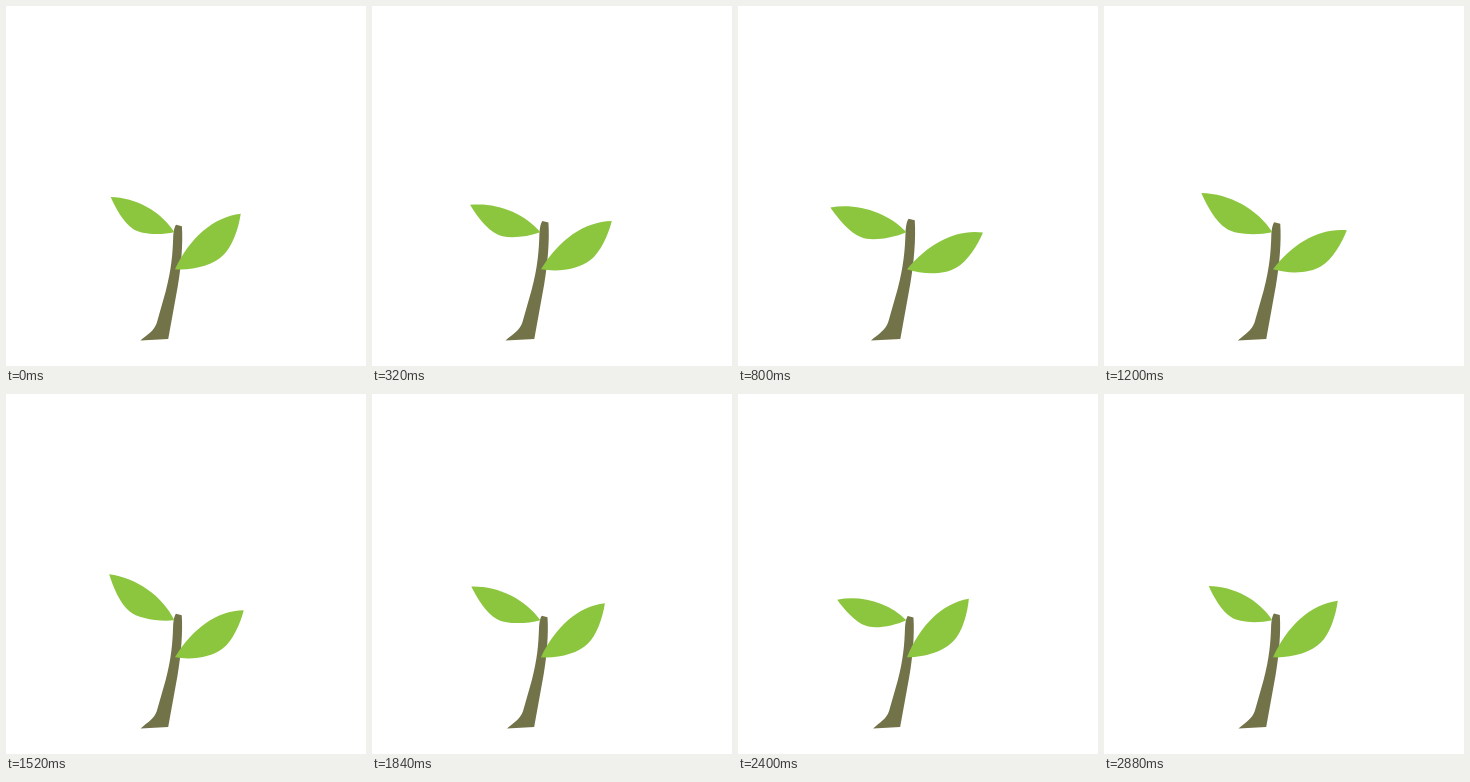
An HTML page with a canvas that plays this animation: 360 by 360 pixels, repeating every 2.96 s.

```html
<!DOCTYPE html>
<html lang="en">
<head>
<meta charset="utf-8">
<title>Seedling</title>
<style>
html, body { margin: 0; width: 100%; height: 100%; overflow: hidden; background: #fff; }
canvas { display: block; width: 100vmin; height: 100vmin; }
</style>
</head>
<body>
<canvas id="stage" width="360" height="360"></canvas>
<script>
const ctx = document.getElementById('stage').getContext('2d');
const LOOP = 2960, STEP = 80;
const GREEN = '#8cc63f', BROWN = '#73734a';
const { cos, PI } = Math;

// Angles in degrees above the horizon, lengths in pixels; p is the loop phase
const leftLeaf = {
  base: [168.4, 226.2], tip: [105, 191.5], side: 1,
  angle: p => 23.7 - 3.7 * cos(p) + 7.4 * cos(2 * p) + 0.5 * cos(3 * p) + cos(4 * p),
  length: p => 76.4 + 4.8 * cos(p - 2.44),
  path: new Path2D('M168.4 226.2C155 205.4 130 192 105 191.5C110 203 118 217 127 222.8C134.5 228.4 154 229.4 168.4 226.2Z')
};
const rightLeaf = {
  base: [169, 263.3], tip: [235, 207.6], side: -1,
  angle: p => 35.8 + 9 * cos(p + 1.19) - 1.4 * cos(2 * p + 2.38),
  length: p => 84.6 + 1.4 * cos(p),
  path: new Path2D('M169 263.3C184 232 207 211 235 207.6C233 222 226.5 241 217.3 249.3C207.5 259.2 187 264.6 169 263.3Z')
};
const stem = {
  foot: [160, 333.5], rest: 114,
  height: p => 115.3 + 4.8 * cos(p - 1.49) + 0.9 * cos(2 * p - 2.98),
  path: new Path2D('M170 219.5L175.8 221C177 238 175.1 261 171.6 281L162.2 333L134.5 334.5C142 328 148 325 150.8 317L159.6 286C165.5 264 166.6 248 167.1 233C167.3 228 168 222 170 219.5Z')
};

function fillAbout([x, y], turn, scale, path, color) {
  ctx.save();
  ctx.translate(x, y);
  ctx.rotate(turn);
  ctx.scale(scale, scale);
  ctx.translate(-x, -y);
  ctx.fillStyle = color;
  ctx.fill(path);
  ctx.restore();
}

function drawLeaf({ base, tip, side, angle, length, path }, p) {
  const dx = Math.abs(tip[0] - base[0]), dy = base[1] - tip[1];
  const turn = side * (angle(p) * PI / 180 - Math.atan2(dy, dx));
  fillAbout(base, turn, length(p) / Math.hypot(dx, dy), path, GREEN);
}

const start = performance.now();
function frame() {
  const now = Math.max(0, performance.now() - start) % LOOP;
  const p = 2 * PI * Math.floor(now / STEP) * STEP / LOOP;
  ctx.fillStyle = '#fff';
  ctx.fillRect(0, 0, 360, 360);
  fillAbout(stem.foot, 0, stem.height(p) / stem.rest, stem.path, BROWN);
  drawLeaf(leftLeaf, p);
  drawLeaf(rightLeaf, p);
  requestAnimationFrame(frame);
}
frame();
</script>
</body>
</html>
```
